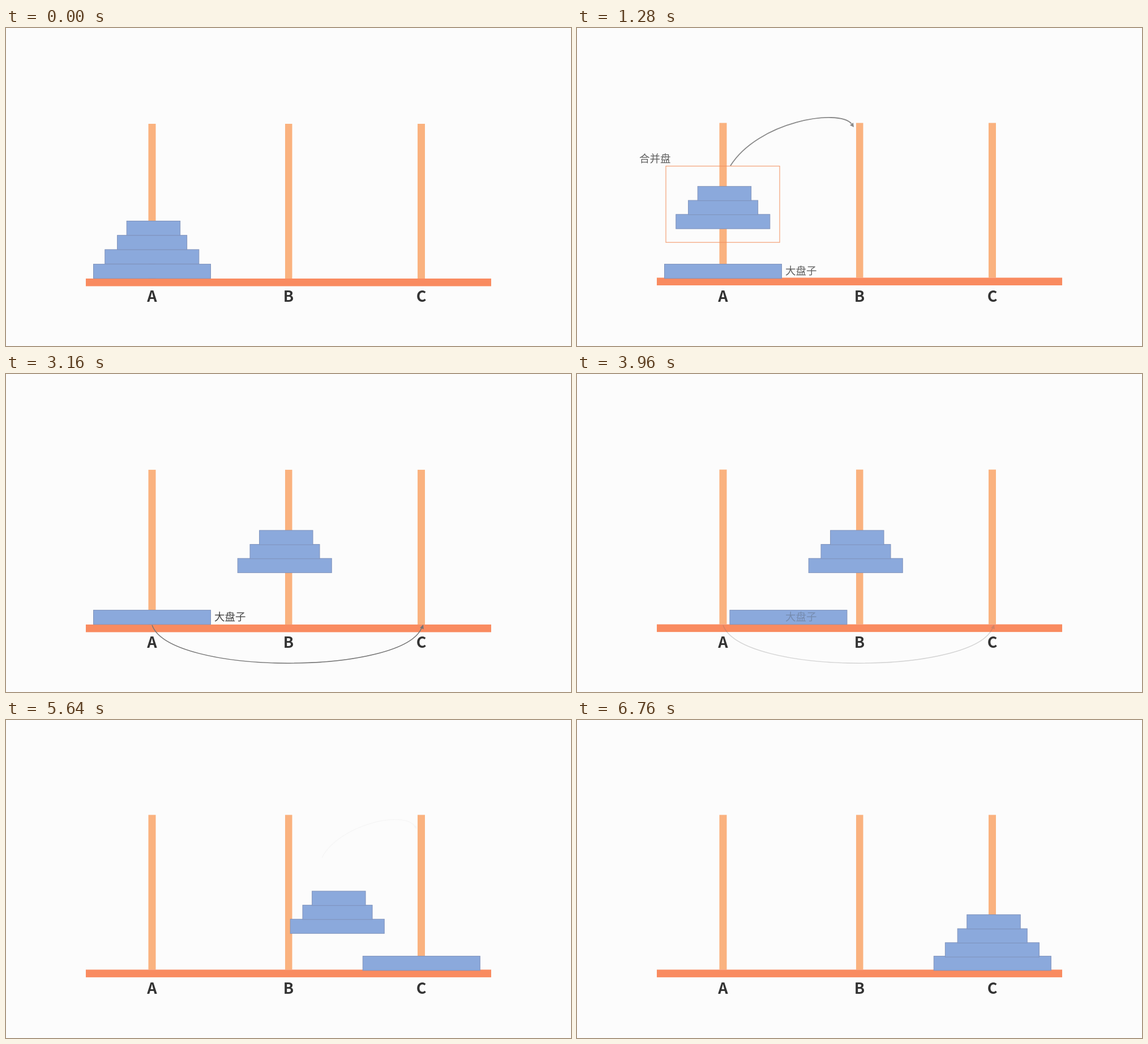
These frames come from a looping animation (998 px wide and 561 px high, 7120 ms). An HTML page:

```html
<!DOCTYPE html>
<html lang="zh-CN">
<head>
<meta charset="utf-8">
<title>Tower of Hanoi</title>
<style>
html, body { margin: 0; width: 100%; height: 100%; overflow: hidden; background: #fcfcfc; }
svg { display: block; width: 100%; height: 100%; }
text { font-family: "Noto Sans CJK SC", "Noto Sans CJK", "Noto Sans", sans-serif; }
.peg { font-size: 27px; font-weight: 700; fill: #333; text-anchor: middle; }
.note { font-size: 18.5px; font-weight: 500; fill: #444; }
.disk { fill: #8ba9dc; stroke: #7f92bb; }
.arrow path { fill: none; stroke: #757575; }
.arrow polygon { fill: #757575; }
</style>
</head>
<body>
<svg viewBox="0 0 998 561">
  <rect width="998" height="561" fill="#fcfcfc"/>
  <g id="stand">
    <g fill="#fab27f">
      <rect x="251.5" y="169" width="13" height="273"/>
      <rect x="493" y="169" width="12.5" height="273"/>
      <rect x="727" y="169" width="13" height="273"/>
    </g>
    <rect x="141" y="442" width="716" height="13.5" fill="#f98b60"/>
  </g>
  <text class="peg" x="258" y="483">A</text>
  <text class="peg" x="499" y="483">B</text>
  <text class="peg" x="733.5" y="483">C</text>

  <rect id="big" class="disk" x="154.5" y="416.6" width="207" height="25.2"/>
  <g id="stack">
    <rect class="disk" x="174.8" width="166" height="25.3"/>
    <rect class="disk" x="196.6" width="123" height="25.3"/>
    <rect class="disk" x="213.2" width="94.4" height="25.3"/>
  </g>

  <g id="merge">
    <rect x="157" y="243.6" width="201" height="134.6" fill="none" stroke="#f2905f" stroke-width="1.2"/>
    <text class="note" x="110" y="236.7">合并盘</text>
    <g class="arrow">
      <path d="M271 243C320 165 462 141.5 485 169" stroke-width="1.8"/>
      <polygon points="489,175 482,171.5 488,167"/>
    </g>
  </g>
  <text id="note" class="note" x="368" y="435.3">大盘子</text>
  <g id="arc" class="arrow">
    <path d="M258 443C290 532 704 532 735 446" stroke-width="1.5"/>
    <polygon points="737,442 731.2,447.8 737.8,450.2"/>
  </g>
  <g id="hop" class="arrow">
    <path d="M558 243C588 185 703 158 722.5 188" stroke-width="1.5"/>
    <polygon points="726,193 720.5,188.8 725.5,185.8"/>
  </g>
</svg>
<script>
const LOOP = 7120, TICK = 40, MOVE = 1268;
const STARTS = [376, 2176, 3736, 5336];
const $ = id => document.getElementById(id);
const [stand, big, stack, merge, note, arc, hop] =
  ["stand", "big", "stack", "merge", "note", "arc", "hop"].map($);

const clamp = v => Math.min(1, Math.max(0, v));
const bezier = (a, b, s) => 3 * a * s * (1 - s) ** 2 + 3 * b * s * s * (1 - s) + s ** 3;

// cubic-bezier(.25, .1, .25, 1)
function ease(u) {
  if (u <= 0 || u >= 1) return clamp(u);
  let lo = 0, hi = 1;
  for (let i = 0; i < 24; i++) {
    const mid = (lo + hi) / 2;
    if (bezier(.25, .25, mid) < u) lo = mid; else hi = mid;
  }
  return bezier(.1, 1, (lo + hi) / 2);
}

// Old parts leave early in a transition, new parts arrive late.
const leave = u => 1 - clamp(u / .25);
const enter = u => clamp((u - .5) / .25);
const move = (el, x, y) => el.setAttribute("transform", `translate(${x.toFixed(2)} ${y.toFixed(2)})`);
const fade = (el, v) => el.setAttribute("opacity", v.toFixed(3));

function draw(time) {
  const t = Math.floor((time % LOOP) / TICK) * TICK;
  const u = STARTS.map(s => clamp((t - s) / MOVE));
  const p = u.map(ease);

  move(stand, 0, -1.6 * (p[0] - p[1] + p[2]));
  move(big, 475.8 * p[2], 0);

  const atB = u[1] > .4;
  move(stack, (atB ? 234.4 : 0) + 241.2 * p[3], 0);
  fade(stack, atB ? enter(u[1]) : leave(u[1]));
  const bottom = 390.9 - 65.6 * p[0] + 67.5 * p[3];
  const step = 25.2 - .5 * p[0];
  [...stack.children].forEach((disk, i) => disk.setAttribute("y", (bottom - step * i).toFixed(2)));

  fade(merge, enter(u[0]) * leave(u[1]));
  fade(note, enter(u[0]) * leave(u[2]));
  fade(arc, enter(u[1]) * leave(u[2]));
  fade(hop, enter(u[2]) * leave(u[3]));
}

const begin = performance.now();
function frame() {
  draw(performance.now() - begin);
  requestAnimationFrame(frame);
}
draw(0);
requestAnimationFrame(frame);
</script>
</body>
</html>
```
